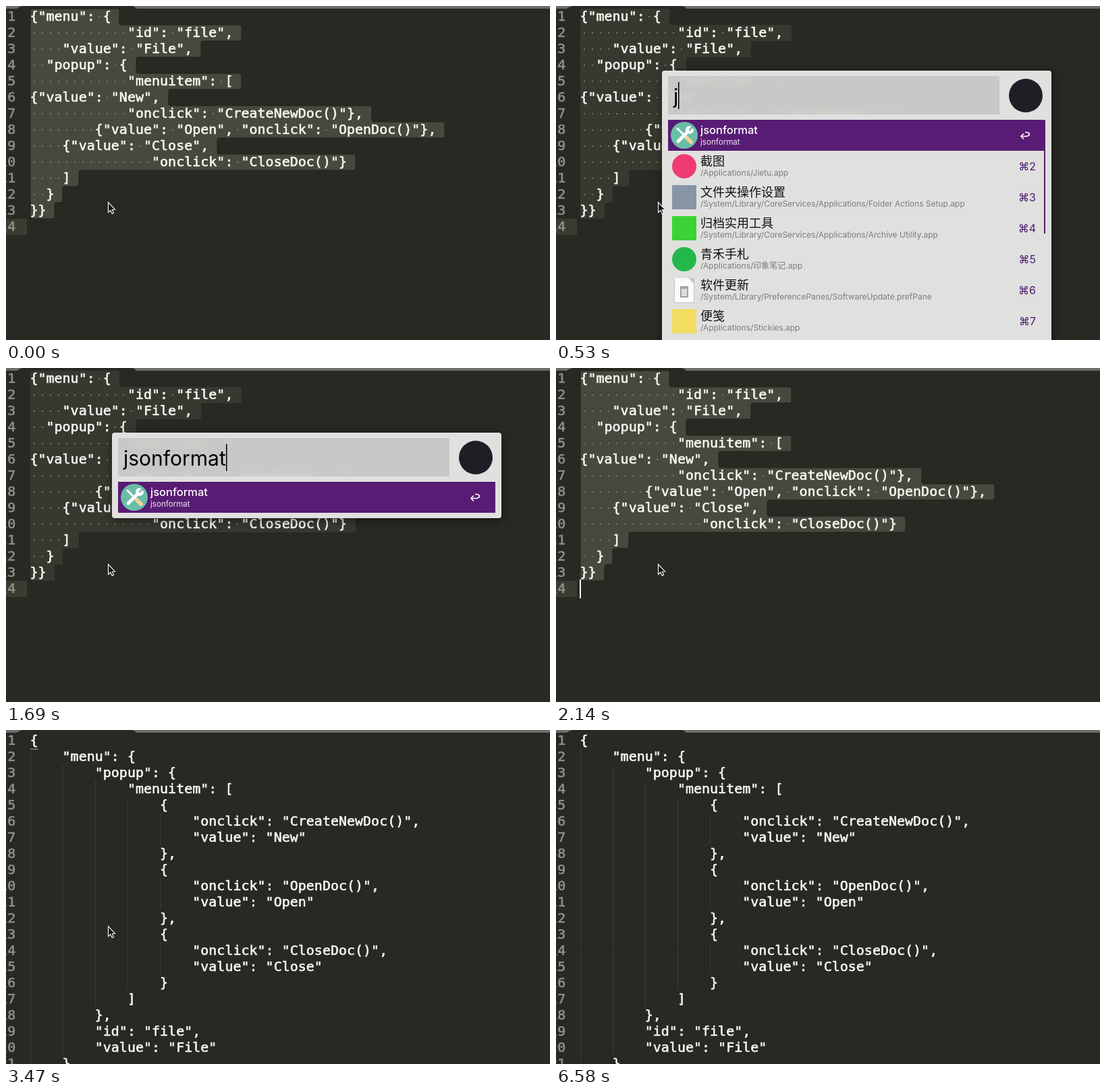
An HTML page with a canvas for the animation above (6.68 s loop, 806x496 px).

```html
<!DOCTYPE html>
<html lang="zh">
<head>
<meta charset="utf-8">
<title>JSON formatting</title>
<style>
html, body { margin: 0; width: 100%; height: 100%; overflow: hidden; background: #282923; }
canvas { display: block; width: 806px; height: 496px; }
</style>
</head>
<body>
<canvas id="stage" width="806" height="496"></canvas>
<script>
const ctx = document.getElementById('stage').getContext('2d');
const LOOP = 6680, LINE = 24, LEFT = 36, TOP = 4, CELL = 12.04;
const MONO = '20px "DejaVu Sans Mono", monospace';
const SANS = 'Inter, "Noto Sans CJK SC", "Noto Sans CJK", sans-serif';
const BG = '#282923', PURPLE = '#581c74';

const messy = `{"menu": {
            "id": "file",
    "value": "File",
  "popup": {
            "menuitem": [
{"value": "New",
            "onclick": "CreateNewDoc()"},
        {"value": "Open", "onclick": "OpenDoc()"},
    {"value": "Close",
               "onclick": "CloseDoc()"}
    ]
  }
}}
`.split('\n');

const data = { menu: {
  popup: { menuitem: ['New', 'Open', 'Close'].map(value => ({
    onclick: value === 'New' ? 'CreateNewDoc()' : value + 'Doc()', value })) },
  id: 'file',
  value: 'File'
} };
const tidy = JSON.stringify(data, null, 4).split('\n');

const apps = [
  ['截图', '/Applications/Jietu.app', 'circle', '#f03a72'],
  ['文件夹操作设置', '/System/Library/CoreServices/Applications/Folder Actions Setup.app', 'square', '#8795a6'],
  ['归档实用工具', '/System/Library/CoreServices/Applications/Archive Utility.app', 'square', '#3bd336'],
  ['青禾手札', '/Applications/印象笔记.app', 'circle', '#24b84a'],
  ['软件更新', '/System/Library/PreferencePanes/SoftwareUpdate.prefPane', 'page', '#fafafa'],
  ['便笺', '/Applications/Stickies.app', 'square', '#f2dc62']
];

const typing = [[1600, 'jsonformat'], [1150, 'jsonf'], [800, 'json'], [710, 'jso'], [620, 'js'], [530, 'j'], [0, '']];
const caretFade = [[3200, 1], [3120, 0.5], [2670, 0], [2580, 0.33], [2490, 0.66], [2140, 1], [0, 0]];
const at = (steps, t) => steps.find(([start]) => t >= start)[1];

function rect(x, y, w, h, color) {
  ctx.fillStyle = color;
  ctx.fillRect(x, y, w, h);
}

function disc(x, y, r, color) {
  ctx.fillStyle = color;
  ctx.beginPath();
  ctx.arc(x, y, r, 0, 7);
  ctx.fill();
}

function text(s, x, y, font, color, align = 'left') {
  ctx.font = font;
  ctx.fillStyle = color;
  ctx.textAlign = align;
  ctx.fillText(s, x, y);
}

// Editor text sits between the regular and bold weights.
function codeText(s, x, row, color, align) {
  const y = TOP + row * LINE + 18;
  text(s, x, y, MONO, color, align);
  ctx.strokeStyle = color;
  ctx.lineWidth = 0.6;
  ctx.lineJoin = 'round';
  ctx.strokeText(s, x, y);
  ctx.lineJoin = 'miter';
}

function trace(points) {
  ctx.beginPath();
  points.forEach(([x, y]) => ctx.lineTo(x, y));
}

function line(points, color, width) {
  trace(points);
  ctx.strokeStyle = color;
  ctx.lineWidth = width;
  ctx.stroke();
}

function drawCode(lines) {
  lines.forEach((s, row) => codeText(s, LEFT - 0.6, row, '#f8f8f2'));
}

function drawGutter(count) {
  for (let n = 1; n <= count; n++) codeText(n, 14.2, n - 1, '#8f908a', 'right');
}

function drawTabs() {
  rect(0, 0, 806, 4, '#6d6e69');
  trace([[16, 4], [21, 1], [25, 0], [186, 0], [190, 1], [193, 4]]);
  ctx.fillStyle = BG;
  ctx.fill();
}

function drawSelection(active) {
  const corners = [[LEFT, TOP]];
  messy.slice(0, -1).forEach((s, i) => {
    const x = Math.round(LEFT + (s.length + 1) * CELL), y = TOP + i * LINE;
    corners.push([x, y], [x, y + LINE]);
  });
  corners.push([LEFT, TOP + 13 * LINE]);
  ctx.beginPath();
  ctx.moveTo(LEFT, TOP + 20);
  corners.forEach(([x, y], i) => {
    const [nx, ny] = corners[(i + 1) % corners.length];
    ctx.arcTo(x, y, nx, ny, 3);
  });
  ctx.closePath();
  ctx.fillStyle = active ? '#49483f' : '#393830';
  ctx.fill();
  if (active) {
    ctx.strokeStyle = '#20211b';
    ctx.lineWidth = 1;
    ctx.stroke();
  }
  messy.forEach((s, row) => [...s].forEach((ch, col) => {
    if (ch === ' ') rect(Math.round(LEFT + col * CELL + 5), TOP + row * LINE + 11, 2, 2, '#78776c');
  }));
}

function drawMessy(t) {
  rect(0, TOP + 13 * LINE, 31, LINE, '#3b3b31');
  drawGutter(14);
  drawSelection(t < 170 || t >= 2140);
  drawCode(messy);
  ctx.globalAlpha = at(caretFade, t);
  rect(35, 314, 2, 28, '#f8f8f0');
  ctx.globalAlpha = 1;
}

function drawTidy(t) {
  drawGutter(tidy.length);
  ctx.setLineDash([1, 1]);
  tidy.forEach((s, row) => {
    const indent = s.search(/\S/), y = TOP + row * LINE;
    for (let col = 0; col < indent; col += 4) {
      const x = Math.floor(LEFT + col * CELL) + 0.5;
      line([[x, y], [x, y + LINE]], '#4b4c45', 1);
    }
  });
  ctx.setLineDash([]);
  drawCode(tidy);
  if (t < 6580) rect(36, 28, 12, 1, '#a3a39c');
}

function drawTools(x, y) {
  disc(x, y, 20, '#6bbda8');
  ctx.lineCap = 'round';
  line([[x - 9, y + 9], [x + 6, y - 6]], '#fff', 5);
  ctx.strokeStyle = '#fff';
  ctx.lineWidth = 4;
  ctx.beginPath();
  ctx.arc(x + 8, y - 8, 4, 0, 4.7);
  ctx.stroke();
  line([[x - 10, y - 10], [x + 3, y + 3]], '#fff', 3);
  line([[x + 4, y + 4], [x + 10, y + 10]], '#f0d59b', 6);
  ctx.lineCap = 'butt';
}

function drawIcon(kind, x, y, color) {
  if (kind === 'circle') disc(x, y, 18, color);
  else if (kind === 'square') rect(x - 18, y - 18, 36, 36, color);
  else {
    rect(x - 15, y - 18, 30, 37, '#c4c4c4');
    trace([[x - 14, y - 18], [x + 6, y - 18], [x + 14, y - 10], [x + 14, y + 18], [x - 14, y + 18]]);
    ctx.fillStyle = color;
    ctx.fill();
    rect(x - 6, y - 6, 12, 17, '#a2a2a2');
    rect(x - 4, y - 2, 8, 11, '#dedede');
  }
}

function drawReturn(x, y) {
  line([[x - 6, y + 1.5], [x + 3, y + 1.5], [x + 6, y], [x + 6, y - 3], [x + 3, y - 4.5], [x, y - 4.5]], '#fff', 1.7);
  line([[x - 2, y - 2.5], [x - 6, y + 1.5], [x - 2, y + 5.5]], '#fff', 1.7);
}

function drawField(query) {
  ctx.save();
  ctx.beginPath();
  ctx.rect(166, 104, 491, 57);
  ctx.clip();
  rect(166, 104, 491, 57, '#c8c8c6');
  ctx.filter = 'blur(4px)';
  ctx.globalAlpha = 0.22;
  drawCode(messy);
  ctx.restore();
  const font = '30px ' + SANS;
  text(query, 174, 145, font, '#000');
  rect(Math.round(174 + ctx.measureText(query).width), 113, 1.5, 40, '#000');
}

function drawLauncher(t) {
  const query = at(typing, t), full = query === 'j';
  const height = full ? 420 : query ? 127 : 73;
  ctx.save();
  ctx.shadowColor = 'rgba(0,0,0,.5)';
  ctx.shadowBlur = 14;
  ctx.shadowOffsetY = 3;
  ctx.fillStyle = '#e0e0df';
  ctx.beginPath();
  ctx.roundRect(157, 96, 577, height, 4);
  ctx.fill();
  ctx.restore();
  drawField(query);
  disc(696, 133, 25, '#211d25');
  if (!query) return;

  rect(166, 169, 559, 46, PURPLE);
  drawTools(190, 192);
  text('jsonformat', 214, 190, '500 16.5px ' + SANS, '#fff');
  text('jsonformat', 214, 206, '11.6px ' + SANS, '#eee5f2');
  drawReturn(695, 192);
  if (!full) return;

  apps.forEach(([name, path, kind, color], i) => {
    const y = 215 + i * 46;
    drawIcon(kind, 190, y + 23, color);
    text(name, 214, y + 22, '18px "Noto Sans CJK SC", "Noto Sans CJK", sans-serif', '#111');
    text(path, 214, y + 37, '12px ' + SANS, '#7c7c7c');
    text('⌘' + (i + 2), 711, y + 29, '16px ' + SANS, '#4b1a70', 'right');
  });
  rect(723, 215, 2, 123, PURPLE);
}

function drawArrow(x, y) {
  trace([[x, y], [x, y + 15], [x + 3.3, y + 12], [x + 5.7, y + 17], [x + 8, y + 16],
    [x + 5.9, y + 11], [x + 10, y + 10.7]]);
  ctx.closePath();
  ctx.fillStyle = '#111';
  ctx.fill();
  ctx.strokeStyle = '#fff';
  ctx.lineWidth = 1.1;
  ctx.stroke();
}

function drawBeam(x, y) {
  const shape = (color, width) => {
    line([[x, y - 7], [x, y + 7]], color, width);
    for (const d of [-1, 1]) line([[x - 3.5, y + 8 * d], [x - 1.5, y + 8 * d], [x, y + 6.5 * d],
      [x + 1.5, y + 8 * d], [x + 3.5, y + 8 * d]], color, width);
  };
  shape('#20211c', 2.5);
  shape('#e6e6e2', 1.1);
}

// Eased progress sampled in eight discrete moves.
function glide(t, start) {
  const step = Math.min(8, Math.floor((t - start) / 87) + 1);
  return 1 - (1 - step / 8) ** 1.5;
}

function bezier(a, b, c, p) {
  return (1 - p) ** 2 * a + 2 * p * (1 - p) * b + p * p * c;
}

function drawPointer(t) {
  if (t < 3830) drawArrow(151.5, 291.5);
  else if (t < 4530) {
    const p = glide(t, 3830);
    drawBeam(Math.round(155 + 298 * p) + 0.5, Math.round(298 + 78 * p));
  } else if (t < 5250) drawBeam(454.5, 377);
  else if (t < 5860) {
    const p = glide(t, 5250);
    drawBeam(Math.round(bezier(454, 592, 744, p)) + 0.5, Math.round(bezier(377, 401, 498, p)));
  }
}

function draw(now) {
  const t = now % LOOP;
  rect(0, 0, 806, 496, BG);
  drawTabs();
  if (t < 3470) drawMessy(t);
  else drawTidy(t);
  if (t >= 170 && t < 2140) drawLauncher(t);
  drawPointer(t);
}

const begin = performance.now();
function tick() {
  draw(performance.now() - begin);
  requestAnimationFrame(tick);
}
tick();
</script>
</body>
</html>
```
